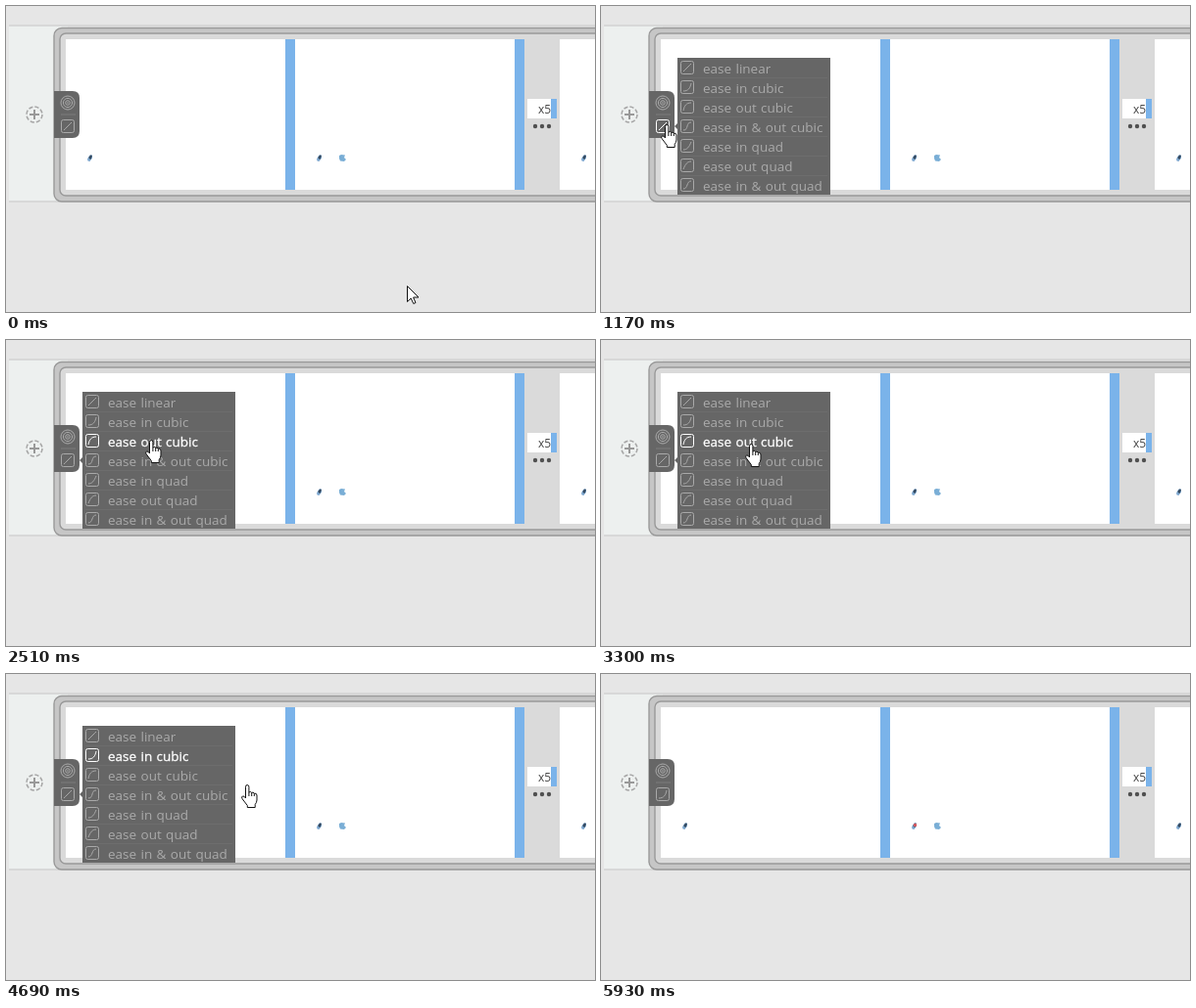
An HTML page for the animation above (6950 ms loop, 601 by 313 pixels).

```html
<!DOCTYPE html>
<html lang="en">
<head>
<meta charset="utf-8">
<title>Easing menu</title>
<style>
  html, body { margin: 0; width: 100%; height: 100%; overflow: hidden; background: #e6e6e6; }
  svg { display: block; width: 601px; height: 313px; cursor: default; }
  text { font-family: "Open Sans", "Noto Sans", sans-serif; font-size: 13.5px; word-spacing: .9px; }
  .icon { fill: none; stroke: #a9a9a9; stroke-width: 1; }
  .row text { fill: #aaa; }
  .on .icon, .icon.on { stroke: #fff; }
  .on text { fill: #fff; stroke: #fff; stroke-width: .3px; }
  .edge { stroke: #999; stroke-width: 1.4; }
  .white { fill: #fff; }
  .blue { fill: #7ab3ea; }
  .panel { fill: #666; }
  .pointer { fill: #fff; stroke: #111; stroke-width: 1; stroke-linejoin: round; }
  #lift { filter: drop-shadow(0 1px 2.5px rgba(0, 0, 0, .4)); }
  #preview { font: 700 16.2px Lato, sans-serif; word-spacing: 0; fill: #737373; }
</style>
</head>
<body>
<svg viewBox="0 0 601 313">
  <defs>
    <g id="bud">
      <path d="M-2.5 1L0-3 2.5-3 2.5 0 0 3.5-2 3Z" fill="#7da7cf"/>
      <path d="M-1.2-.5L.7-3 2.5-2.5 1.2 1.2-.2 1Z" fill="#34495f"/>
    </g>
  </defs>

  <rect width="601" height="313" fill="#e6e6e6"/>
  <rect x="3" y="20" width="60" height="180" fill="#edf0ef"/>
  <path d="M3 20H601M3 200H601" stroke="#d2d2d2" stroke-width="1.5"/>
  <g fill="none" stroke="#a5a5a5" stroke-width="1.5">
    <circle cx="29" cy="111" r="8" stroke-dasharray="4.3 2"/>
    <path d="M24 111H34M29 106V116" stroke="#999" stroke-width="2"/>
  </g>

  <rect class="edge" x="49" y="22.5" width="580" height="177.5" rx="8" fill="#c6c6c6"/>
  <rect class="edge" x="55" y="28" width="580" height="166" rx="6" fill="#dadada"/>

  <path class="white" d="M61 34H285V188H61Z"/>
  <path class="blue" d="M285 34H295V188H285Z"/>
  <g id="hover">
    <path d="M61 34H285V188H61Z" fill="#ededed"/>
    <path d="M61 168H285V188H61Z" fill="#b9b9b9"/>
    <path d="M285 168H295V188H285Z" fill="#a9a9a9"/>
    <g id="grip" fill="#444"></g>
    <text id="preview" x="82.5" y="111">Click to preview from here</text>
    <path class="panel" d="M55 33V15Q55 10 60 10H114Q121 10 121 17V28H60Q56 28 55 33Z"/>
    <text x="60.5" y="24" fill="#fff">Smooth</text>
  </g>
  <g id="second">
    <path class="white" d="M295 34H519V188H295Z"/>
    <path class="blue" d="M519 34H529V188H519Z"/>
  </g>
  <path class="white" d="M565 34H601V188H565ZM532 95H556V115H532Z"/>
  <path class="blue" d="M556 95H562V115H556Z"/>
  <text x="543" y="110" fill="#444" style="font-size:12px">x5</text>
  <g fill="#505050">
    <circle cx="540" cy="123" r="2.2"/><circle cx="547" cy="123" r="2.2"/><circle cx="554" cy="123" r="2.2"/>
  </g>

  <use href="#bud" x="85.5" y="155.5"/>
  <use href="#bud" x="319.5" y="155.5"/>
  <use href="#bud" x="589.5" y="155.5"/>
  <path id="spark" d="M319 153H322V156H319Z" fill="#cf5a62"/>
  <path d="M340 153L342 152 346 152.5 345 155 347 157 345 159 341 158.5 340 156Z" fill="#7aaed6"/>

  <path class="panel" d="M49 87H68Q75 87 75 94V128Q75 135 68 135H49Z"/>
  <g fill="none" stroke="#aaa">
    <circle cx="63" cy="99" r="7"/><circle cx="63" cy="99" r="4.6"/><circle cx="63" cy="99" r="2.3"/>
    <circle cx="63" cy="99" r=".8" fill="#aaa" stroke="none"/>
    <path d="M56 111H71" stroke="#7d7d7d"/>
  </g>
  <path id="tool" class="icon" transform="translate(56 116)"/>

  <g id="menu">
    <path class="panel" d="M78 53H234V193H78V126L75 123 78 120Z"/>
  </g>

  <path id="arrow" class="pointer" d="M.5.5V16.5L4.2 13 6.8 18.5 9 17.5 6.6 12H12Z"/>
  <g id="hand">
    <path class="pointer" d="M4.5 14V2.5Q4.5 .5 6.2 .5T7.9 2.5V8Q9.4 6.6 10.7 8.4Q12 7.4 13.3 9.2Q15.8 8.6 16 11V16Q15.8 18.5 14.2 20.5V23.5H6.3V21.5L1.2 14.8Q-.2 12.6 1.4 12T4.5 14Z"/>
    <path d="M7.9 8V12M10.7 8.4V12M13.3 9.2V12" stroke="#111" fill="none"/>
  </g>
</svg>
<script>
const LOOP = 6950;
const $ = id => document.getElementById(id);

// Bursts of screen updates: first time, last time, count.
const bursts = [
  [0, 0, 1], [70, 700, 9], [780, 870, 2], [1020, 1170, 3], [1420, 1420, 1],
  [1630, 2190, 8], [2350, 2980, 9], [3060, 3530, 7], [3760, 4310, 8],
  [4460, 4930, 7], [5160, 5850, 10], [5930, 5930, 1]
];
const times = bursts.flatMap(([from, to, n]) =>
  Array.from({ length: n }, (_, i) => from + (n > 1 ? (to - from) * i / (n - 1) : 0)));

// Pointer tip: step, x, y.
const path = [
  [0, 409, 287], [4, 300, 222], [7, 170, 150], [9, 84, 127], [11, 67, 122],
  [14, 67, 122], [15, 68, 121], [19, 110, 95], [23, 136, 66], [26, 148, 103],
  [31, 150, 157], [32, 151, 151], [36, 153, 107], [39, 148, 81], [47, 275, 121],
  [51, 236, 111], [54, 207, 88], [61, 483, 225], [64, 554, 309], [65, 580, 340]
];

const box = "M2.5 .5H11.5Q13.5 .5 13.5 2.5V11.5Q13.5 13.5 11.5 13.5H2.5Q.5 13.5 .5 11.5V2.5Q.5 .5 2.5 .5Z";
const curve = (a, b, c, d) => `${box}M3 11C${a} ${b} ${c} ${d} 11 3`;
const easings = [
  ["ease linear", curve(5, 9, 9, 5)],
  ["ease in cubic", curve(8, 11, 10, 8)],
  ["ease out cubic", curve(4, 6, 6, 3)],
  ["ease in & out cubic", curve(9, 11, 5, 3)],
  ["ease in quad", curve(7, 11, 9, 8)],
  ["ease out quad", curve(5, 6, 7, 3)],
  ["ease in & out quad", curve(8, 11, 6, 3)]
];

function add(parent, tag, attrs) {
  const el = document.createElementNS("http://www.w3.org/2000/svg", tag);
  for (const key in attrs) el.setAttribute(key, attrs[key]);
  return parent.appendChild(el);
}

const rows = easings.map(([label, d], i) => {
  const y = 64 + 20 * i;
  if (i) add($("menu"), "path", { d: `M81 ${y - 10.5}H231`, stroke: "#6d6d6d" });
  const row = add($("menu"), "g", { class: "row" });
  add(row, "path", { class: "icon", d, transform: `translate(81 ${y - 8})` });
  add(row, "text", { x: 104, y: y + 5 }).textContent = label;
  return row;
});

for (let i = 0; i < 8; i++)
  add($("grip"), "circle", { cx: 162 + 6 * (i % 4), cy: i < 4 ? 174.5 : 180, r: 1.6 });

function tipAt(step) {
  const i = Math.max(1, path.findIndex(p => p[0] >= step));
  const [s0, x0, y0] = path[i - 1], [s1, x1, y1] = path[i];
  const k = (step - s0) / (s1 - s0);
  return [Math.round(x0 + (x1 - x0) * k), Math.round(y0 + (y1 - y0) * k)];
}

const within = (n, from, to) => n >= from && n <= to;
const show = (id, on) => { $(id).style.display = on ? "" : "none"; };

function draw(time) {
  const step = times.filter(t => t <= time + .01).length - 1;
  const [x, y] = tipAt(step);
  const menuOpen = within(step, 12, 54);
  const handOn = within(step, 6, 62);

  show("hover", within(step, 6, 9) || within(step, 55, 62));
  $("second").style.filter = within(step, 57, 62) ? "drop-shadow(0 1px 2.5px rgba(0,0,0,.4))" : "";
  show("spark", step >= 64);

  show("menu", menuOpen);
  $("menu").style.opacity = Math.min(1, (step - 11) / 3);
  // The chosen row stays lit once it has been clicked.
  const lit = step >= 39 ? 1 : x >= 78 ? Math.floor((y - 54) / 20) : -1;
  rows.forEach((row, i) => row.classList.toggle("on", i === lit));

  $("tool").setAttribute("d", easings[step >= 55 ? 1 : 0][1]);
  $("tool").classList.toggle("on", step >= 10 && x < 76);

  show("hand", handOn);
  show("arrow", !handOn && step < 65);
  $("hand").setAttribute("transform", `translate(${x - 6} ${y - 1})`);
  $("arrow").setAttribute("transform", `translate(${x} ${y - 1})`);
}

const start = performance.now();
function tick() {
  draw((performance.now() - start) % LOOP);
  requestAnimationFrame(tick);
}
tick();
</script>
</body>
</html>
```
